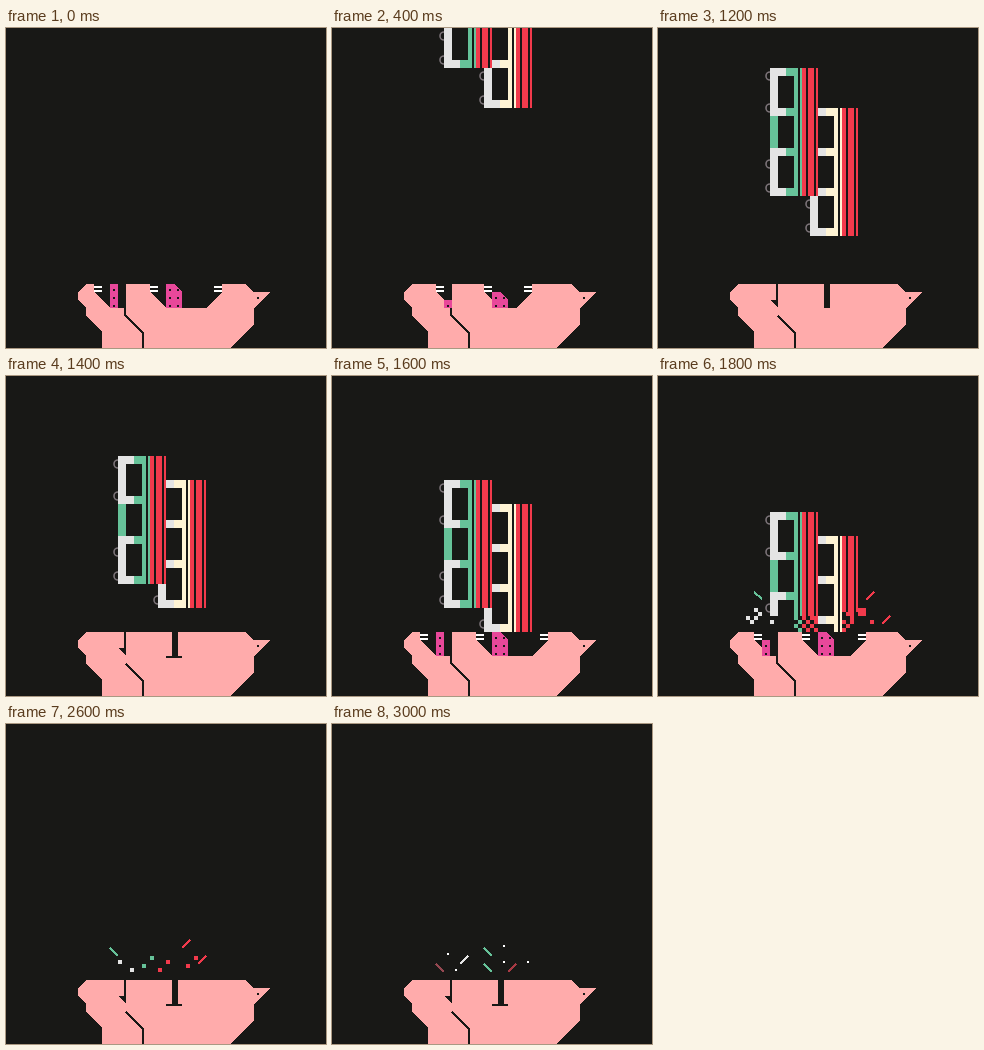
An HTML page without scripts that plays this animation: 320 by 320 pixels, repeating every 3200 ms.

```html
<!DOCTYPE html>
<html lang="en">
<head>
<meta charset="utf-8">
<title>Hungry for binders</title>
<style>
html, body { margin: 0; width: 100%; height: 100%; overflow: hidden; background: #181816; }
svg { display: block; width: 100vw; height: 100vh; shape-rendering: crispEdges; }
.dark { fill: #181816; }
.skin { fill: #ffabab; }
.red { fill: #f23a4c; }
.pale { fill: #e4e4e4; }
.gum { fill: url(#dots); }
.ring { fill: none; stroke: #7c7479; stroke-width: 1.6; shape-rendering: auto; }
.teeth { fill: none; stroke: #fff; stroke-width: 2; }
.seam { fill: none; stroke: #181816; stroke-width: 2; }
/* crumbs are 4px dashes, sparks thin diagonals */
.bit { fill: none; stroke-width: 4; }
.spark { fill: none; stroke-width: 2; }
.speck { fill: #fff; }
.r { stroke: #f23a4c; }
.g { stroke: #66c299; }
.w { stroke: #e4e4e4; }
.m { stroke: #944851; }

.step, .jaw { opacity: 0; }
.step { animation: step 3.2s step-end calc(var(--i) * .2s - 3.2s) infinite; }
.jaw { animation: jaw 1.6s step-end calc(var(--i) * .2s - 1.6s) infinite; }
.bite { animation: bite 3.2s step-end infinite; }
.left { animation: left 3.2s step-end infinite; }
.right { animation: right 3.2s step-end infinite; }
@keyframes step { 0% { opacity: 1 } 6.25%, 100% { opacity: 0 } }
@keyframes jaw { 0% { opacity: 1 } 12.5%, 100% { opacity: 0 } }
@keyframes bite { 0% { opacity: 0 } 56.25%, 100% { opacity: 1 } }
@keyframes left {
  0% { transform: translateY(-150px) }
  6.25% { transform: translateY(-128px) }
  12.5% { transform: translateY(-88px) }
  18.75% { transform: translateY(-40px) }
  25% { transform: translateY(0) }
  31.25% { transform: translateY(16px) }
  37.5% { transform: translateY(40px) }
  43.75% { transform: translateY(80px) }
  50% { transform: translateY(104px) }
  56.25% { transform: translateY(136px) }
  62.5% { transform: translateY(168px) }
  68.75% { transform: translateY(192px) }
  75% { transform: translateY(216px) }
  81.25%, 100% { transform: translateY(330px) }
}
@keyframes right {
  0% { transform: translateY(-150px) }
  6.25% { transform: translateY(-88px) }
  12.5% { transform: translateY(-48px) }
  18.75% { transform: translateY(-8px) }
  25% { transform: translateY(32px) }
  31.25% { transform: translateY(56px) }
  37.5% { transform: translateY(80px) }
  43.75% { transform: translateY(104px) }
  50% { transform: translateY(128px) }
  56.25% { transform: translateY(160px) }
  62.5% { transform: translateY(192px) }
  68.75% { transform: translateY(216px) }
  75% { transform: translateY(240px) }
  81.25%, 100% { transform: translateY(330px) }
}
</style>
</head>
<body>
<svg viewBox="0 0 320 320">
  <defs>
    <pattern id="dots" width="8" height="8" patternUnits="userSpaceOnUse">
      <rect width="8" height="8" fill="#e8489a"/>
      <rect class="dark" x="3" y="5" width="2" height="2"/>
    </pattern>
    <path id="teeth" class="teeth" d="M0 259h8M0 263h8"/>
    <!-- the cover colour comes from fill on each use -->
    <g id="binder">
      <g class="ring">
        <circle cx="112" cy="8" r="4"/><circle cx="112" cy="40" r="4"/>
        <circle cx="112" cy="96" r="4"/><circle cx="112" cy="120" r="4"/>
      </g>
      <path class="dark" d="M112 0h48v128h-48z"/>
      <path d="M112 48h8v32h-8zM136 0h4v128h-4zM142 0h2v128h-2zM128 0h8v8h-8zM128 40h8v8h-8zM128 80h8v8h-8zM128 120h8v8h-8z"/>
      <path class="pale" d="M112 0h16v8h-8v32h8v8h-16zM112 80h16v8h-8v32h8v8h-16z"/>
      <path class="red" d="M144 0h4v128h-4zM150 0h6v128h-6zM158 0h2v128h-2z"/>
    </g>
  </defs>

  <rect class="dark" width="320" height="320"/>
  <g class="right"><use href="#binder" x="40" fill="#fff4d4"/></g>
  <g class="left"><use href="#binder" fill="#66c299"/></g>
  <path class="dark bite" d="M104 240h56v16h-56zM184 236h16v20h-16z"/>

  <!-- crumbs -->
  <g class="step" style="--i:9">
    <path class="bit w" d="M88 242h4M92 246h4M96 234h4M100 238h4M96 242h4M112 246h4"/>
    <path class="bit g" d="M136 242h4M140 246h4M136 250h4M140 254h4"/>
    <path class="bit r" d="M144 242h4M152 242h8M148 246h4M156 246h4M144 250h4M152 250h4M148 254h4M156 254h4M188 238h8M200 234h8M192 242h4M200 238h4M184 246h4M192 246h4M204 238h4M212 246h4M188 250h4M184 254h4"/>
    <path class="spark g" d="M96 216l8 7"/>
    <path class="spark r" d="M208 224l8-8M224 248l8-8"/>
  </g>
  <g class="step" style="--i:10">
    <path class="dark" d="M160 248h24v8h-24z"/>
    <path class="bit w" d="M80 234h4M84 238h4M96 242h4M104 246h4M112 242h4"/>
    <path class="bit g" d="M92 230h4M136 242h4M140 246h4M136 254h4"/>
    <path class="bit r" d="M148 242h4M156 242h4M144 246h4M152 246h4M148 254h4M184 238h4M192 238h8M188 242h4M204 238h4M200 242h4M196 246h4M212 234h4M216 242h4M188 250h4"/>
    <path class="spark w" d="M64 232l8 8"/>
    <path class="spark g" d="M88 216l8 8"/>
    <path class="spark r" d="M208 220l8-8M224 232l8-8"/>
  </g>
  <g class="step" style="--i:11">
    <path class="dark" d="M160 244h24v12h-24z"/>
    <path class="bit g" d="M96 226h4M100 230h4M96 234h4M108 242h4M116 242h4M104 246h4M112 246h4M136 242h4M140 246h4M136 250h4M136 254h4"/>
    <path class="bit r" d="M148 242h4M156 242h4M144 246h4M152 246h4M156 238h4M184 238h4M192 238h4M188 242h4M200 234h4M204 238h4M200 242h4M196 238h4M184 246h4M192 246h4M188 250h4M184 254h4M220 226h4M216 230h4M220 242h4M216 246h4"/>
    <path class="spark g" d="M88 233l8 7"/>
    <path class="spark r" d="M208 224l8-8M232 240l8-8"/>
  </g>
  <g class="step" style="--i:12">
    <path class="dark" d="M160 240h24v16h-24z"/>
    <path class="bit w" d="M104 234h4M112 242h4M116 246h4"/>
    <path class="bit g" d="M96 238h4M108 246h4M136 242h4M140 246h4M136 254h4"/>
    <path class="bit r" d="M148 242h4M156 242h4M144 246h4M152 246h4M184 242h4M188 246h4M196 238h4M204 230h4M208 242h4"/>
    <path class="spark g" d="M80 224l8 8"/>
    <path class="spark r" d="M200 208l-8 8M224 232l8-8"/>
  </g>
  <g class="step" style="--i:13">
    <path class="bit w" d="M112 238h4M124 246h4"/>
    <path class="bit g" d="M136 242h4M144 234h4"/>
    <path class="bit r" d="M152 246h4M160 238h4M180 242h4M188 234h4"/>
    <path class="spark g" d="M104 224l8 8"/>
    <path class="spark r" d="M176 224l8-8M192 240l8-8"/>
  </g>
  <g class="step" style="--i:14">
    <path class="speck" d="M115 237h2v2h-2zM139 229h2v2h-2zM171 245h2v2h-2zM187 229h2v2h-2z"/>
    <path class="spark g" d="M144 232l8 8"/>
    <path class="spark w" d="M120 248l8-8"/>
    <path class="spark r" d="M104 232l8 8M176 240l8-8"/>
  </g>
  <g class="step" style="--i:15">
    <path class="speck" d="M115 229h2v2h-2zM123 245h2v2h-2zM171 221h2v2h-2zM171 237h2v2h-2zM195 237h2v2h-2z"/>
    <path class="spark m" d="M104 240l8 8"/>
    <path class="spark w" d="M128 240l8-8"/>
    <path class="spark g" d="M152 224l8 8M152 240l8 8"/>
    <path class="spark" stroke="#a83a44" d="M176 248l8-8"/>
  </g>

  <!-- the two eaters -->
  <path class="skin" d="M80 256H239L248 264H264L248 280V296L224 320H96V304L80 288V280L72 272V264z"/>
  <path class="dark" d="M251 269h2v2h-2z"/>
  <path class="seam" d="M120 288L137 305V320"/>

  <g class="jaw" style="--i:0">
    <path class="dark" d="M88 256H120V288H118V280H104L88 264zM144 256H216V264L200 280H160L144 264z"/>
    <path class="gum" d="M104 256h8v24h-8zM160 256h8l8 8v16h-16z"/>
    <use href="#teeth" x="88"/><use href="#teeth" x="144"/><use href="#teeth" x="208"/>
  </g>
  <g class="jaw" style="--i:1">
    <path class="dark" d="M96 256H120V288H118V280H104V272L96 264zM144 256H208V264L192 280H160L144 264z"/>
    <path class="gum" d="M104 264h8v16h-8zM160 256h8l8 8v16h-16z"/>
    <use href="#teeth" x="96"/><use href="#teeth" x="144"/><use href="#teeth" x="200"/>
  </g>
  <g class="jaw" style="--i:2">
    <path class="dark" d="M104 256H120V288H118V280H112V272L104 264zM152 256H200V264L184 280H160V272L152 264z"/>
    <path class="gum" d="M112 272h8v8h-8zM160 264h8l8 8v8h-16z"/>
    <use href="#teeth" x="104"/><use href="#teeth" x="152"/><use href="#teeth" x="192"/>
  </g>
  <g class="jaw" style="--i:3">
    <path class="dark" d="M112 256H120V280H118V270L112 264zM152 256H184V264L176 272V280H160V272L152 264z"/>
    <path class="gum" d="M160 272h8l8 8h-16z"/>
    <use href="#teeth" x="112"/><use href="#teeth" x="152"/><use href="#teeth" x="176"/>
  </g>
  <g id="shut" class="jaw" style="--i:4">
    <path class="dark" d="M118 256h2v24l-8-8h6zM166 256h6v24h-6z"/>
  </g>
  <g class="jaw" style="--i:5">
    <path class="dark" d="M118 256h2v24l-8-8h6zM166 256h6v24h4v2h-16v-2h6z"/>
  </g>
  <g class="jaw" style="--i:6">
    <path class="dark" d="M118 256h2v24l-8-8h6zM166 256h6v24h-6z"/>
  </g>
  <g class="jaw" style="--i:7">
    <path class="dark" d="M118 256h2v24l-8-8h6zM166 256h6v24h4v2h-16v-2h6z"/>
  </g>
</svg>
</body>
</html>
```
